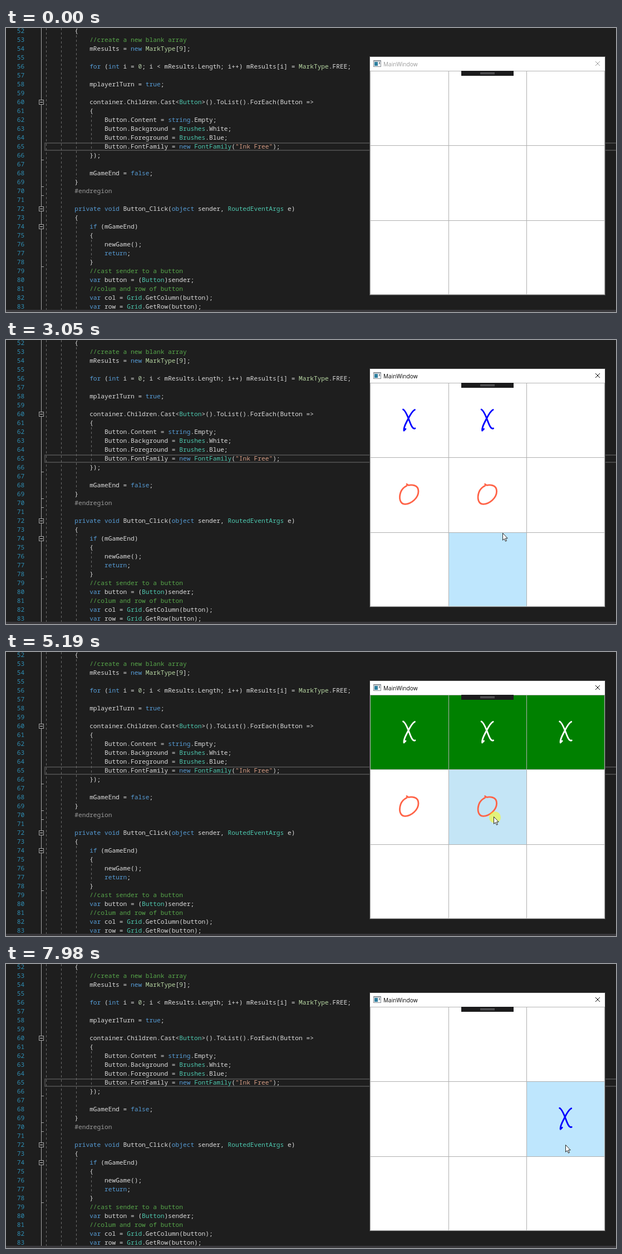
Recreate the animation shown at these times as an HTML page. Size 1096x511 px, loop 8 s.

```html
<!DOCTYPE html>
<html lang="en">
<head>
<meta charset="utf-8">
<title>Noughts and crosses beside its code</title>
<style>
  html, body { margin: 0; width: 100%; height: 100%; overflow: hidden; background: #1e1e1e; }
  svg { display: block; width: 1096px; height: 511px; }
  rect { shape-rendering: crispEdges; }
  #code text { font: 11.2px "Noto Sans Mono", "DejaVu Sans Mono", monospace; fill: #dcdcdc; white-space: pre; }
  #code .num { fill: #2f8fb5; }
  #code .comment { fill: #57a64a; }
  #code .region { fill: #9b9b9b; }
  #code .string { fill: #d69d85; }
  #code .enum { fill: #b8d7a3; }
  #code .type { fill: #4ec9b0; }
  #code .key { fill: #569cd6; }
  #code .digit { fill: #b5cea8; }
  .guide { stroke: #6b6b6b; stroke-dasharray: 4 4; }
  .fold { fill: none; stroke: #a5a5a5; shape-rendering: crispEdges; }
  #frame { fill: #fff; stroke: #555; }
  #title { font: 10.1px "Open Sans", "Noto Sans", sans-serif; fill: #999; }
  #close { stroke: #999; fill: none; }
  .active #frame { stroke: #3c3c3c; }
  .active #title { fill: #000; }
  .active #close { stroke: #000; }
  #marks path { fill: none; stroke-width: 2.8; stroke-linecap: round; stroke-linejoin: round; }
</style>
</head>
<body>
<svg viewBox="0 0 1096 511">
  <rect width="1096" height="511" fill="#1e1e1e"/>
  <rect x="70" y="206.5" width="1040" height="13" fill="none" stroke="#464646" stroke-width="2"/>
  <path class="guide" d="M72.5 0V507M99.5 0V507M126.5 13V270M126.5 349V507M153.5 157V222M153.5 381V414"/>
  <path class="fold" d="M63.5 0V507M64 237.5H68M64 285.5H68M64 301.5H68M64 429.5H68"/>
  <g id="folds"></g>
  <g id="code"></g>
  <rect y="507" width="1096" height="4" fill="#3a393c"/>

  <g id="window">
    <rect id="frame" x="653.5" y="51.5" width="423" height="429"/>
    <rect x="660" y="58" width="14" height="12" fill="#8a9096"/>
    <rect x="661" y="60" width="12" height="9" fill="#f4f6f8"/>
    <rect x="662" y="61" width="6" height="7" fill="#2f7f9f"/>
    <rect x="670" y="61" width="2" height="4" fill="#8a9096"/>
    <text id="title" x="678" y="69">MainWindow</text>
    <path id="close" d="M1059 60l8 8M1067 60l-8 8"/>
    <g id="cells"></g>
    <g fill="#b0b0b0">
      <rect x="795" y="77" width="1" height="403"/>
      <rect x="935" y="77" width="1" height="403"/>
      <rect x="654" y="211" width="422" height="1"/>
      <rect x="654" y="346" width="422" height="1"/>
    </g>
    <path d="M654.5 480V77.5H1075.5V479.5H654" fill="none" stroke="#b4b4b4" shape-rendering="crispEdges"/>
    <g id="marks"></g>
    <rect x="818" y="77" width="94" height="9" fill="#1b1b1c"/>
    <rect x="852" y="80" width="26" height="1" fill="#77777a"/>
    <rect x="852" y="82" width="26" height="1" fill="#77777a"/>
  </g>

  <g id="cursor">
    <circle id="click" cx="2.5" cy="1.5" r="10.5" fill="#ff0" fill-opacity=".5"/>
    <path d="M.5 .5V13.3L3.4 10.6L5.4 15.2L7.4 14.3L5.4 9.8H9.2Z" fill="#fff" stroke="#111" stroke-width=".9"/>
  </g>
</svg>
<script>
const LOOP = 8000;
const $ = id => document.getElementById(id);

function add(parent, tag, attrs) {
  const el = document.createElementNS('http://www.w3.org/2000/svg', tag);
  for (const name in attrs) el.setAttribute(name, attrs[name]);
  parent.append(el);
  return el;
}

// ---- editor ----
const source = `        {
            //create a new blank array
            mResults = new MarkType[9];

            for (int i = 0; i < mResults.Length; i++) mResults[i] = MarkType.FREE;

            mplayer1Turn = true;

            container.Children.Cast<Button>().ToList().ForEach(Button =>
            {
                Button.Content = string.Empty;
                Button.Background = Brushes.White;
                Button.Foreground = Brushes.Blue;
                Button.FontFamily = new FontFamily("Ink Free");
            });

            mGameEnd = false;
        }
        #endregion

        private void Button_Click(object sender, RoutedEventArgs e)
        {
            if (mGameEnd)
            {
                newGame();
                return;
            }
            //cast sender to a button
            var button = (Button)sender;
            //colum and row of button
            var col = Grid.GetColumn(button);
            var row = Grid.GetRow(button);`;

const token = new RegExp([
  '(?<comment>//.*)',
  '(?<region>#endregion)',
  '(?<string>"[^"]*")',
  '(?<enum>\\bMarkType\\b)',
  '(?<type>\\b(?:Brushes|Grid|RoutedEventArgs)\\b|FontFamily(?=\\()|(?<=[<(])Button(?=[>)]))',
  '(?<key>\\b(?:new|for|int|true|false|string|private|void|object|if|return|var)\\b)',
  '(?<digit>\\b\\d+\\b)'
].join('|'), 'g');

function span(text, part, kind) {
  if (part) add(text, 'tspan', kind ? { class: kind } : {}).textContent = part;
}

source.split('\n').forEach((line, i) => {
  const y = 9 + 16 * i;
  add($('code'), 'text', { x: 19.8, y, class: 'num' }).textContent = 52 + i;
  const body = line.trimStart();
  if (!body) return;
  const text = add($('code'), 'text', { x: 69.5 + 6.72 * (line.length - body.length), y });
  let at = 0;
  for (const m of body.matchAll(token)) {
    span(text, body.slice(at, m.index));
    span(text, m[0], Object.keys(m.groups).find(k => m.groups[k]));
    at = m.index + m[0].length;
  }
  span(text, body.slice(at));
});

for (const y of [134, 326, 358]) {
  add($('folds'), 'rect', { x: 59.5, y: y - 4.5, width: 8, height: 8, fill: '#1e1e1e', stroke: '#a5a5a5' });
  add($('folds'), 'rect', { x: 61, y: y - 1, width: 5, height: 1, fill: '#dcdcdc' });
}

// ---- board ----
const xs = [654, 795, 935, 1076];
const ys = [77, 211, 346, 480];
const shapes = {
  X: 'M-10.5-19C-6-17-2-6 1 2S7 17 11 15M10.5-18.5C7-17 2-9-2-1S-10 13-9 19L-6 16',
  O: 'M-4-19L-1-17C5-18 17-18 17-6C17 6 4 17-7 17C-17 17-18 5-15-4C-13-10-8-14-4-16'
};
const cells = [], marks = [];
for (let i = 0; i < 9; i++) {
  const c = i % 3, r = Math.floor(i / 3);
  cells.push(add($('cells'), 'rect', {
    x: xs[c], y: ys[r], width: xs[c + 1] - xs[c], height: ys[r + 1] - ys[r]
  }));
  marks.push(add($('marks'), 'path', {
    transform: `translate(${724 + 140.6 * c} ${144 + 134.3 * r})`
  }));
}

// ---- timeline (ms) ----
// start and end of each burst of movement, played in steps of about STEP
const STEP = 78;
const bursts = [
  [70, 500], [660, 1460], [1550, 2020], [2190, 2970], [3050, 3840], [3910, 4220],
  [4540, 4950], [5190, 5650], [5790, 6190], [6420, 7220], [7430, 7980]
];
// cursor: time, x, y
const path = [
  [70, 971, 490], [357, 755, 205], [500, 738, 182], [740, 738, 182], [900, 865, 267],
  [1140, 868, 272], [1220, 866, 258], [1460, 852, 173], [1700, 849, 161], [2020, 854, 169],
  [2268, 854, 169], [2502, 755, 262], [2736, 740, 276], [2814, 765, 325], [2892, 830, 356],
  [3050, 892, 347], [3287, 985, 205], [3366, 1000, 182], [3840, 1003, 186], [4220, 994, 486],
  [4622, 970, 410], [4786, 895, 315], [4950, 876, 296], [5267, 876, 296], [5650, 892, 395],
  [5790, 902, 433], [6190, 925, 410], [6500, 945, 408], [7220, 1006, 396], [7587, 1005, 325],
  [LOOP, 1005, 325]
];
const ACTIVE = 655, WIN = 3600, RESET = 5262, PRESS = 80;
const moves = [[0, 'X', 735], [4, 'O', 1135], [1, 'X', 2265], [3, 'O', 2733], [2, 'X', WIN], [5, 'X', 7975]];
const releases = [...moves.map(m => m[2]), RESET];

function snap(t) {
  const burst = bursts.filter(b => b[0] <= t).pop();
  if (!burst) return 0;
  const [from, to] = burst, n = Math.round((to - from) / STEP), step = (to - from) / n;
  return from + step * Math.min(n, Math.floor((t - from) / step + 1e-6));
}

function position(t) {
  const i = Math.max(1, path.findIndex(p => p[0] >= t));
  const [t0, x0, y0] = path[i - 1], [t1, x1, y1] = path[i];
  const k = Math.max(0, (t - t0) / (t1 - t0));
  return [Math.round(x0 + (x1 - x0) * k), Math.round(y0 + (y1 - y0) * k)];
}

function cellAt(x, y) {
  if (x < xs[0] || x >= xs[3] || y < ys[0] || y >= ys[3]) return -1;
  return xs.findLastIndex(v => v <= x) + 3 * ys.findLastIndex(v => v <= y);
}

function draw(now) {
  const t = snap(now % LOOP);
  const shown = t >= path[0][0];
  const [x, y] = position(t);
  const pressed = releases.some(r => t >= r - PRESS && t < r);
  const hover = shown ? cellAt(x, y) : -1;
  const won = t >= WIN && t < RESET;

  $('window').setAttribute('class', t >= ACTIVE ? 'active' : '');
  $('cursor').setAttribute('visibility', shown ? 'visible' : 'hidden');
  $('cursor').setAttribute('transform', `translate(${x} ${y})`);
  $('click').setAttribute('opacity', pressed ? 1 : 0);

  cells.forEach((cell, i) => {
    const fill = i === hover ? (pressed ? '#c4e5f6' : '#bee6fd') : won && i < 3 ? '#008000' : '#fff';
    cell.setAttribute('fill', fill);
    const move = moves.find(m => m[0] === i && t >= m[2] && (t < RESET || m[2] > RESET));
    marks[i].setAttribute('d', move ? shapes[move[1]] : '');
    if (move) marks[i].setAttribute('stroke', move[1] === 'O' ? '#ff6347' : won ? '#fff' : '#00f');
  });
}

const start = performance.now();
function tick() {
  draw(performance.now() - start);
  requestAnimationFrame(tick);
}
tick();
</script>
</body>
</html>
```
